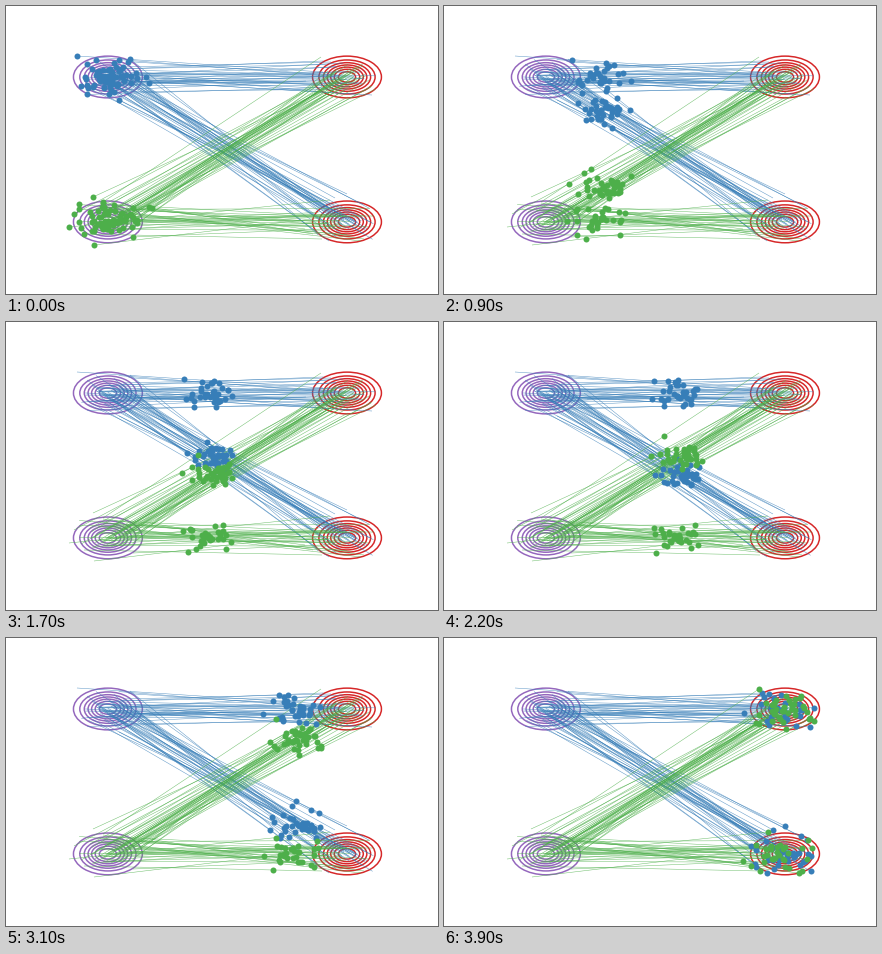
Recreate the animation shown at these times as a matplotlib script. Size 432x288 px, loop 4 s.

```python
import numpy as np
import matplotlib.pyplot as plt
from matplotlib.animation import FuncAnimation
from matplotlib.collections import LineCollection
from matplotlib.patches import Ellipse

W, H = 432, 288
FRAMES, INTERVAL = 40, 100
LEFT, RIGHT, TOP, BOTTOM = 101.9, 341.0, 71.0, 215.9
SX, SY = 16.91, 10.25  # one standard deviation in pixels
BLUE, GREEN = "#377eb8", "#4daf4a"
PURPLE, RED = "tab:purple", "tab:red"

rng = np.random.default_rng(4)

# Outlying particles of each flow: start x, start y, end x, end y
blue_across = [
    (71, 50, 317, 66), (88, 79, 300, 75), (143, 77, 333, 70),
    (108, 86, 341, 83), (93, 73, 366, 89), (117, 61, 325, 56),
    (96, 70, 337, 57), (120, 69, 355, 66),
]
blue_down = [
    (92, 68, 341, 188), (113, 94, 351, 217), (81, 58, 311, 226),
    (86, 63, 323, 235), (105, 68, 307, 208), (140, 71, 338, 214),
    (124, 53, 335, 222), (118, 75, 329, 192),
]
green_up = [
    (97, 196, 315, 51), (119, 214, 365, 81), (146, 202, 322, 65),
    (68, 208, 315, 77), (87, 191, 315, 86), (103, 219, 342, 91),
    (75, 222, 330, 76), (84, 206, 347, 66),
]
green_across = [
    (88, 239, 322, 211), (78, 228, 316, 233), (97, 197, 299, 223),
    (63, 221, 324, 194), (95, 211, 368, 210), (124, 208, 355, 235),
    (143, 201, 307, 228), (127, 231, 340, 222),
]


def cloud(n, cx, cy):
    """Gaussian points kept inside the core of one mode."""
    z = np.clip(rng.normal(0, 0.82, (n, 2)), -1.7, 1.7)
    return np.array([cx, cy]) + z * [SX, SY]


def flow(outliers, n, y0, y1):
    """Start and end points of one flow between two modes."""
    out = np.array(outliers, float)
    start = np.vstack([out[:, :2], cloud(n, LEFT, y0)])
    end = np.vstack([out[:, 2:], cloud(n, RIGHT, y1)])
    return start, end


def join(*flows):
    return [np.vstack(part) for part in zip(*flows)]


groups = [
    (BLUE, *join(flow(blue_across, 26, TOP, TOP),
                 flow(blue_down, 30, TOP, BOTTOM))),
    (GREEN, *join(flow(green_up, 32, BOTTOM, TOP),
                  flow(green_across, 23, BOTTOM, BOTTOM))),
]

fig = plt.figure(figsize=(W / 72, H / 72), dpi=72, facecolor="white")
ax = fig.add_axes([0, 0, 1, 1])
ax.set_xlim(0, W)
ax.set_ylim(H, 0)
ax.axis("off")

# Density contours at levels 0.01 ... 0.07 of a Gaussian with variance 2
peak = 1 / (4 * np.pi)
radii = np.sqrt(2 * np.log(peak / (0.01 * np.arange(1, 8))))
for cx, color in ((LEFT, PURPLE), (RIGHT, RED)):
    for cy in (TOP, BOTTOM):
        for r in radii:
            ax.add_patch(Ellipse((cx, cy), 2 * r * SX, 2 * r * SY, fill=False,
                                 edgecolor=color, linewidth=1.5, zorder=1))

dots = []
for color, start, end in groups:
    ax.add_collection(LineCollection(np.stack([start, end], axis=1),
                                     colors=color, linewidths=0.5,
                                     alpha=0.8, zorder=2))
    dots.append(ax.scatter(*start.T, s=36, color=color, linewidths=0, zorder=3))


def update(i):
    t = i / (FRAMES - 1)
    for (_, start, end), dot in zip(groups, dots):
        dot.set_offsets((1 - t) * start + t * end)
    return dots


anim = FuncAnimation(fig, update, frames=FRAMES, interval=INTERVAL,
                     repeat=True, repeat_delay=0)
plt.show()
```
